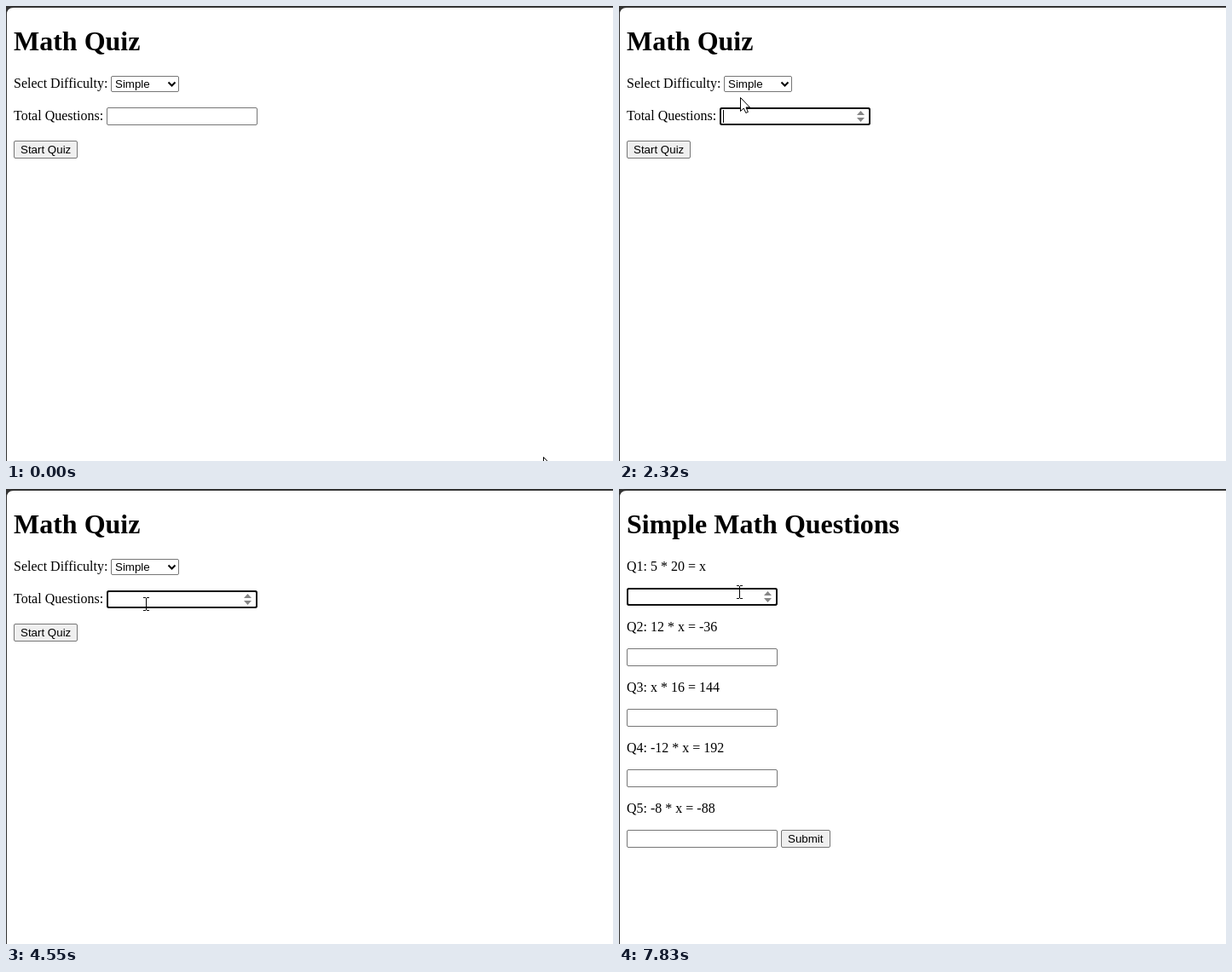
Write an HTML page that moves like this. It is 712x534 px and loops after 8000 ms.

```html
<!DOCTYPE html>
<html lang="en">
<head>
<meta charset="utf-8">
<title>Math Quiz</title>
<style>
  html, body { margin: 0; width: 100%; height: 100%; overflow: hidden; background: #333; }
  svg { display: block; width: 712px; height: 534px; }
  text { font: 16px "Liberation Serif", "Times New Roman", serif; font-variant-ligatures: none; white-space: pre; }
  .title { font-size: 32px; font-weight: bold; }
  .ui { font: 13.333px "Liberation Sans", Arial, sans-serif; }
  .box { fill: #fff; stroke: #767676; rx: 1.5px; }
  .button { fill: #efefef; stroke: #767676; rx: 1.5px; }
  .ring { fill: none; stroke: #101010; stroke-width: 2; rx: 2px; }
  .spin { fill: #858585; }
  .shadow { fill: #fff; filter: drop-shadow(0 24px 19px rgba(0, 0, 0, .34)); }
  .edge { fill: none; stroke: rgba(0, 0, 0, .3); }
</style>
</head>
<body>
<svg viewBox="0 0 712 534">
  <rect width="712" height="534" fill="#333"/>
  <path d="M1 534V10Q1 2 9 2H712V534Z" fill="#fff"/>

  <g id="setup">
    <text class="title" x="9" y="52">Math Quiz</text>
    <text x="9" y="96">Select Difficulty:</text>
    <rect class="box" x="123.5" y="82.5" width="79" height="18"/>
    <text class="ui" x="128" y="96">Simple</text>
    <path d="M190.5 89.5l4 4 4-4" fill="none" stroke="#000" stroke-width="2"/>
    <text x="9" y="134">Total Questions:</text>
    <g id="setupFields"></g>
    <text id="answer" class="ui" x="122" y="134">5</text>
    <rect class="button" x="9.5" y="158.5" width="74" height="20"/>
    <text class="ui" x="17" y="173">Start Quiz</text>
    <g id="popup">
      <rect class="shadow" x="123.5" y="105.5" width="79" height="49" rx="6"/>
      <path d="M124 130V112Q124 106 130 106H196Q202 106 202 112V130Z" fill="#767676"/>
      <rect class="edge" x="123.5" y="105.5" width="79" height="49" rx="6"/>
      <text class="ui" x="128" y="123" fill="#fff">Simple</text>
      <text class="ui" x="128" y="147">Quadratic</text>
    </g>
  </g>

  <g id="quiz">
    <text class="title" x="9" y="52">Simple Math Questions</text>
    <g id="quizFields"></g>
    <rect class="button" x="190.5" y="400.5" width="57" height="20"/>
    <text class="ui" x="198" y="415">Submit</text>
  </g>

  <rect id="caret" width="1" height="15"/>
  <path id="arrow" d="M.5 .5V16.5L4.3 13L6.8 18.5L9.4 17.4L7 12H11.5Z" fill="#fff" stroke="#000"/>
  <path id="beam" d="M-3 -7.5H0M1 -7.5H4M.5 -7V7M-3 7.5H0M1 7.5H4" fill="none" stroke="#000"/>
</svg>
<script>
  const LOOP = 8000, OPEN = 2580, CHOOSE = 3540, REFOCUS = 4050, TYPE = 5330, SUBMIT = 6180;
  const LINE = 71, BLINK = 500;

  const $ = id => document.getElementById(id);
  const show = (el, on) => el.setAttribute('visibility', on ? 'inherit' : 'hidden');
  const clamp = v => Math.max(0, Math.min(1, v));
  const easeOut = k => 1 - (1 - k) ** 2;

  // The pointer rests between glides; each one continues from wherever it is.
  const glide = (start, duration, x, y) => ({ start, duration, x, y });
  const glides = [
    glide(30, 1, 147, 212),
    glide(290, 50, 130, 187),
    glide(530, 300, 145, 180),
    glide(830, 510, 177, 145),
    glide(1530, 570, 145, 125),
    glide(2270, 150, 140, 93),
    glide(OPEN, 410, 162, 114),
    glide(4020, 100, 164, 135),
    glide(TYPE, 200, 56, 163),
    glide(5680, 260, 35, 157),
    glide(SUBMIT, 400, 228, 396),
    glide(6730, 670, 141, 121)
  ];

  function pointerAt(t) {
    let x = 630, y = 529;
    for (const g of glides) {
      const k = easeOut(clamp((t - g.start) / g.duration));
      x += (g.x - x) * k;
      y += (g.y - y) * k;
    }
    return [Math.round(x), Math.round(y)];
  }

  const fields = [];
  function addField(page, x, y, ...focus) {
    const parent = $(page + 'Fields');
    parent.insertAdjacentHTML('beforeend', `<g>
      <rect class="box" x="${x + .5}" y="${y + .5}" width="176" height="20"/>
      <path class="spin" d="M${x + 161} ${y + 9}l4.5 -5 4.5 5zM${x + 161} ${y + 12}l4.5 5 4.5 -5z"/>
      <rect class="ring" x="${x + 1}" y="${y + 1}" width="175" height="19"/></g>`);
    const [, spin, ring] = parent.lastElementChild.children;
    fields.push({ page, x, y, focus, spin, ring });
  }

  addField('setup', 118, 119, [1900, OPEN], [REFOCUS, SUBMIT]);
  const tasks = ['5 * 20 = x', '12 * x = -36', 'x * 16 = 144', '-12 * x = 192', '-8 * x = -88'];
  tasks.forEach((task, i) => {
    $('quizFields').insertAdjacentHTML('beforeend',
      `<text x="9" y="${96 + LINE * i}">Q${i + 1}: ${task}</text>`);
    addField('quiz', 9, 116 + LINE * i, ...(i ? [] : [[7330, LOOP]]));
  });

  // The blink restarts on focus and on typing.
  function drawCaret(t, field, focusStart, typed) {
    const since = t - (typed ? TYPE : focusStart);
    show($('caret'), since % (2 * BLINK) < BLINK);
    $('caret').setAttribute('x', field.x + (typed ? 11 : 4));
    $('caret').setAttribute('y', field.y + 3);
  }

  function draw(t) {
    const page = t < SUBMIT ? 'setup' : 'quiz';
    const typed = t >= TYPE && t < SUBMIT;
    const popupOpacity = clamp((t - OPEN) / 100) * clamp((CHOOSE + 200 - t) / 200);
    const [px, py] = pointerAt(t);

    show($('setup'), page === 'setup');
    show($('quiz'), page === 'quiz');
    show($('answer'), typed);
    show($('popup'), popupOpacity > 0);
    $('popup').style.opacity = popupOpacity;

    let overField = false;
    show($('caret'), false);
    for (const f of fields) {
      const hover = f.page === page && (t < OPEN || t >= 4020) &&
        px >= f.x && px < f.x + 177 && py >= f.y && py < f.y + 21;
      const focus = f.focus.find(([from, to]) => t >= from && t < to);
      overField ||= hover;
      show(f.spin, hover || focus);
      show(f.ring, focus);
      if (focus) drawCaret(t, f, focus[0], typed);
    }

    for (const id of ['arrow', 'beam']) {
      $(id).setAttribute('transform', `translate(${px} ${py})`);
      show($(id), overField === (id === 'beam'));
    }
  }

  function tick() {
    draw(performance.now() % LOOP);
    requestAnimationFrame(tick);
  }
  tick();
</script>
</body>
</html>
```
